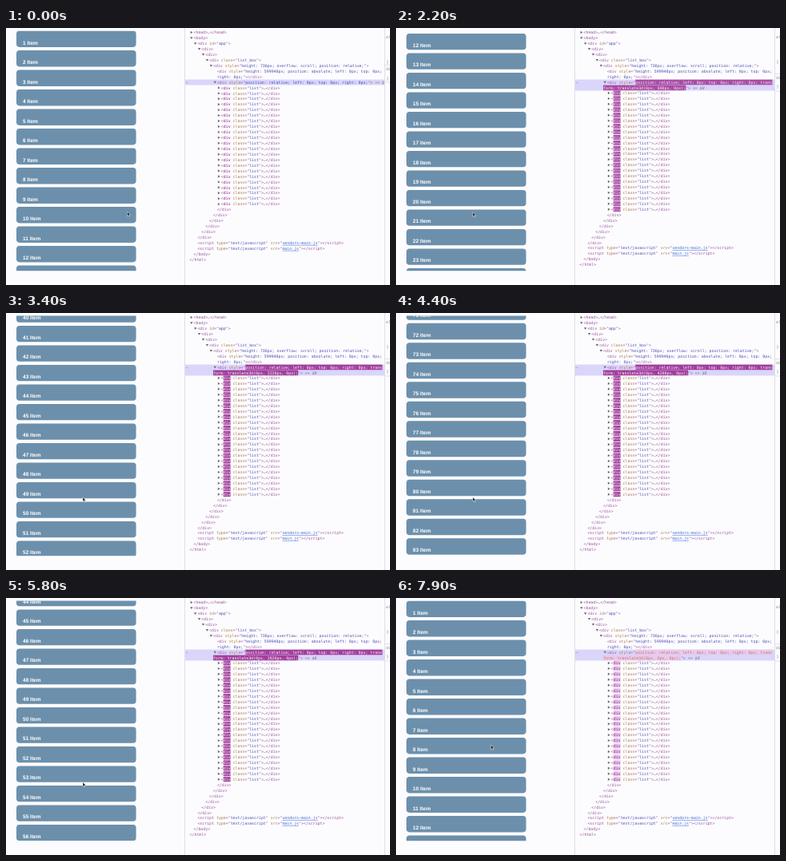
Recreate the animation shown at these times as an HTML page. Size 480x322 px, loop 8000 ms.

```html
<!DOCTYPE html>
<html lang="en">
<head>
<meta charset="utf-8">
<title>Virtual list</title>
<style>
  html, body { margin: 0; width: 100%; height: 100%; overflow: hidden; background: #fcfcfe; }
  svg { display: block; width: 100vw; height: 100vh; }
  text { white-space: pre; text-rendering: geometricPrecision; }
  .code { font: 4.9px "DejaVu Sans Mono", "Liberation Mono", monospace; fill: #98509a; }
  .name { fill: #ad7848; }
  .val { fill: #4c4cb4; }
  .link { fill: #3a66d4; text-decoration: underline; }
  .dim { fill: #888; }
  .ref { fill: #777; font-style: italic; }
  .arrow { fill: #6e6e6e; }
  .item rect { fill: #6c90ac; }
  .item text { font: bold 6.55px "Liberation Sans", Arial, sans-serif; fill: #fff; }
  .rule { stroke: #d9d7e4; stroke-width: .8; }
</style>
</head>
<body>
<svg viewBox="0 0 480 322" preserveAspectRatio="none">
  <defs>
    <clipPath id="listClip"><rect y="3.5" width="223" height="300.8"/></clipPath>
    <clipPath id="treeClip"><rect x="224" width="249" height="322"/></clipPath>
  </defs>
  <g id="list" clip-path="url(#listClip)"></g>
  <g id="tree" class="code" clip-path="url(#treeClip)"></g>
  <path class="rule" d="M223.5 0V322M473.5 0V322"/>
  <g id="side" class="code"></g>
  <path id="cursor" d="M0 0V5.4L1.3 4.3L2.2 6.3L3.1 5.9L2.2 3.9H3.9Z" fill="#111" stroke="#fff" stroke-width=".5"/>
</svg>
<script>
const LOOP = 8000, PITCH = 24.5, TOP = 3.5, POOL = 14;
const LINE = 6.94, CHAR = 2.95, INDENT = 4.9;
const START = 800, LAG = 80, FLASH = 1400;
const $ = id => document.getElementById(id);

// Scroll offset in items: [ms, offset, items per second]
const scrollKeys = [
  [START, 0, 0], [1500, 4.61, 1.5], [2200, 10.86, 1.5], [3400, 39.47, 22],
  [4400, 70.62, 1], [4650, 71, 0], [5800, 43.6, -46], [7200, 0, 0]
];
// Pointer path: [ms, x, y]
const cursorKeys = [[100, 151.5, 230.3], [800, 96, 230.8], [7250, 96, 230.8], [7800, 118.6, 184.3]];

const segment = (keys, t) => {
  const i = keys.findIndex(k => k[0] > t);
  return [keys[i - 1], keys[i]];
};

function scrollAt(t) {
  if (t <= START || t >= scrollKeys.at(-1)[0]) return 0;
  const [a, b] = segment(scrollKeys, t);
  const d = b[0] - a[0], u = (t - a[0]) / d, v = 1 - u, s = d / 1000;
  return v * v * ((1 + 2 * u) * a[1] + u * s * a[2]) + u * u * ((3 - 2 * u) * b[1] - v * s * b[2]);
}

function cursorAt(t) {
  const first = cursorKeys[0], last = cursorKeys.at(-1);
  if (t <= first[0]) return first.slice(1);
  if (t >= last[0]) return last.slice(1);
  const [a, b] = segment(cursorKeys, t);
  const u = (t - a[0]) / (b[0] - a[0]), e = u * u * (3 - 2 * u);
  return [1, 2].map(i => a[i] + (b[i] - a[i]) * e);
}

// Markup helpers for the element tree
const esc = s => s.replace(/</g, "&lt;").replace(/>/g, "&gt;");
const span = (cls, s) => `<tspan class="${cls}">${s}</tspan>`;
const attr = (name, value, cls = "val") => ` ${span("name", name)}="${span(cls, value)}"`;
const open = (tag, attrs = "") => `${esc("<" + tag)}${attrs}&gt;`;
const close = tag => esc(`</${tag}>`);
const xAt = depth => 229.6 + depth * INDENT;
const yAt = row => 5.5 + row * LINE;
const put = (x, y, s) => `<text x="${x}" y="${y + 1.7}">${s}</text>`;

function line(row, depth, s, arrow = "") {
  const x = xAt(depth) - 4.4, y = yAt(row);
  const shape = arrow === "down" ? `M${x} ${y - 1.2}h3.4l-1.7 2.7z` : `M${x + .5} ${y - 1.7}v3.4l2.7 -1.7z`;
  return (arrow && `<path class="arrow" d="${shape}"/>`) + put(xAt(depth), y, s);
}

function buildTree() {
  const inset = "left: 0px; top: 0px;", base = `position: relative; ${inset} right: 0px;`;
  const ref = span("ref", " == $0"), selX = xAt(7), selY = yAt(9), hotX = selX + 12 * CHAR;
  const dots = span("dim", "…");
  const head = [
    [1, open("head") + dots + close("head"), "right"],
    [1, open("body"), "down"],
    [2, open("div", attr("id", "app")), "down"],
    [3, open("div"), "down"],
    [4, open("div"), "down"],
    [5, open("div", attr("class", "list_box")), "down"],
    [6, open("div", attr("style", "height: 736px; overflow: scroll; position: relative;")), "down"],
    [7, `&lt;div ${span("name", "style")}="${span("val", `height: 599940px; position: absolute; ${inset}`)}`],
    [7, span("val", "right: 0px;") + '"&gt;' + close("div")]
  ].map(([d, s, a], i) => line(i, d, s, a)).join("");

  let below = "";
  for (let i = 0; i < 22; i++) {
    const row = 10 + i, x = xAt(8);
    below += `<rect class="hotBg" x="${x + CHAR}" y="${yAt(row) - 3}" width="${3 * CHAR}" height="6"/>` +
      line(row, 8, `&lt;${span("hotTag", "div")}${attr("class", "list")}&gt;${dots}${close("div")}`, "right");
  }
  for (let i = 0; i < 6; i++) below += line(32 + i, 7 - i, close("div"));
  ["vendors~main.js", "main.js"].forEach((file, i) => {
    below += line(38 + i, 2, open("script", attr("type", "text/javascript") + attr("src", file, "link")) + close("script"));
  });
  below += line(40, 1, close("body")) + line(41, 0, close("html"));

  $("tree").innerHTML = head +
    `<rect id="sel" x="224" y="${selY - 3.4}" width="249" fill="#d9d5fb"/>` +
    put(224.6, selY, span("dim", "⋯")) +
    `<g id="still">${line(9, 7, open("div", attr("style", base)) + ref, "down")}</g>
     <g id="moved">
       <rect class="hotBg" x="${hotX}" y="${selY - 3.3}" width="${58 * CHAR}" height="6.6"/>
       <rect class="hotBg" id="wrapBg" x="${xAt(6)}" y="${selY + LINE - 3.3}" height="6.6"/>
       ${line(9, 7, `&lt;div ${span("name", "style")}="${span("hot", base + " trans")}`, "down")}
       ${put(xAt(6), selY + LINE, `<tspan class="hot" id="wrap"></tspan>"&gt;${ref}`)}
     </g>
     <g id="below">${below}</g>`;
}

function buildSide() {
  const part = (id, di, brace, rule) => `<g id="${id}" class="dim">${put(475, 11.5, "el")}${put(475.5, 42.5, "}")}` +
    `${put(475, di, "di")}${put(475.5, brace, "}")}<path class="rule" d="M474 ${di - 4.5}H480M474 ${rule}H480"/></g>`;
  $("side").innerHTML = part("sideStill", 51, 63, 68) + part("sideMoved", 62, 73, 79);
}

function buildList() {
  $("list").innerHTML = `<g class="item"><rect x="13" width="149.6" height="20.4" rx="3.8"/><text x="21" y="17"></text></g>`.repeat(POOL);
}

const mix = (a, b, u) => `rgb(${a.map((v, i) => Math.round(v + (b[i] - v) * u))})`;
const show = (id, on) => $(id).setAttribute("display", on ? "inline" : "none");

// Time since the rendered window last changed
function flashAge(t) {
  const now = Math.floor(scrollAt(t - LAG));
  for (let age = 10; age < FLASH; age += 10) {
    if (t - age < START || Math.floor(scrollAt(t - age - LAG)) !== now) return age;
  }
  return FLASH;
}

function drawTree(t) {
  const moved = t >= START;
  show("still", !moved);
  show("moved", moved);
  show("sideStill", !moved);
  show("sideMoved", moved);
  $("sel").setAttribute("height", moved ? 2 * LINE : LINE);
  $("below").setAttribute("transform", `translate(0 ${moved ? LINE - .4 : 0})`);

  const wrap = `form: translate3d(0px, ${Math.floor(scrollAt(t - LAG)) * 60}px, 0px);`;
  $("wrap").textContent = wrap;
  $("wrapBg").setAttribute("width", wrap.length * CHAR);

  const f = moved ? flashAge(t) / FLASH : 1;
  const u = 1 - (1 - Math.min(f / .8, 1)) ** 2, rest = Math.max(0, (f - .8) / .2);
  const bg = mix([158, 54, 153], [240, 214, 244], u);
  const hot = f < .8 ? mix([255, 255, 255], [190, 110, 90], u) : mix([190, 110, 90], [76, 76, 180], rest);
  const tag = mix([255, 255, 255], [136, 18, 128], u);
  hotBg.forEach(e => { e.style.fill = bg; e.style.opacity = 1 - rest; });
  hotText.forEach(e => e.style.fill = hot);
  hotTag.forEach(e => e.style.fill = tag);
}

function drawList(t) {
  const s = scrollAt(t), first = Math.floor(s);
  items.forEach((g, i) => {
    g.setAttribute("transform", `translate(0 ${TOP + (first + i - s) * PITCH})`);
    g.lastChild.textContent = `${first + i + 1} Item`;
  });
}

buildList();
buildTree();
buildSide();
const all = sel => [...document.querySelectorAll(sel)];
const items = all(".item"), hotBg = all(".hotBg"), hotText = all(".hot"), hotTag = all(".hotTag");

const origin = performance.now();
function frame() {
  const t = (performance.now() - origin) % LOOP;
  drawList(t);
  drawTree(t);
  $("cursor").setAttribute("transform", `translate(${cursorAt(t)})`);
  requestAnimationFrame(frame);
}
frame();
</script>
</body>
</html>
```
